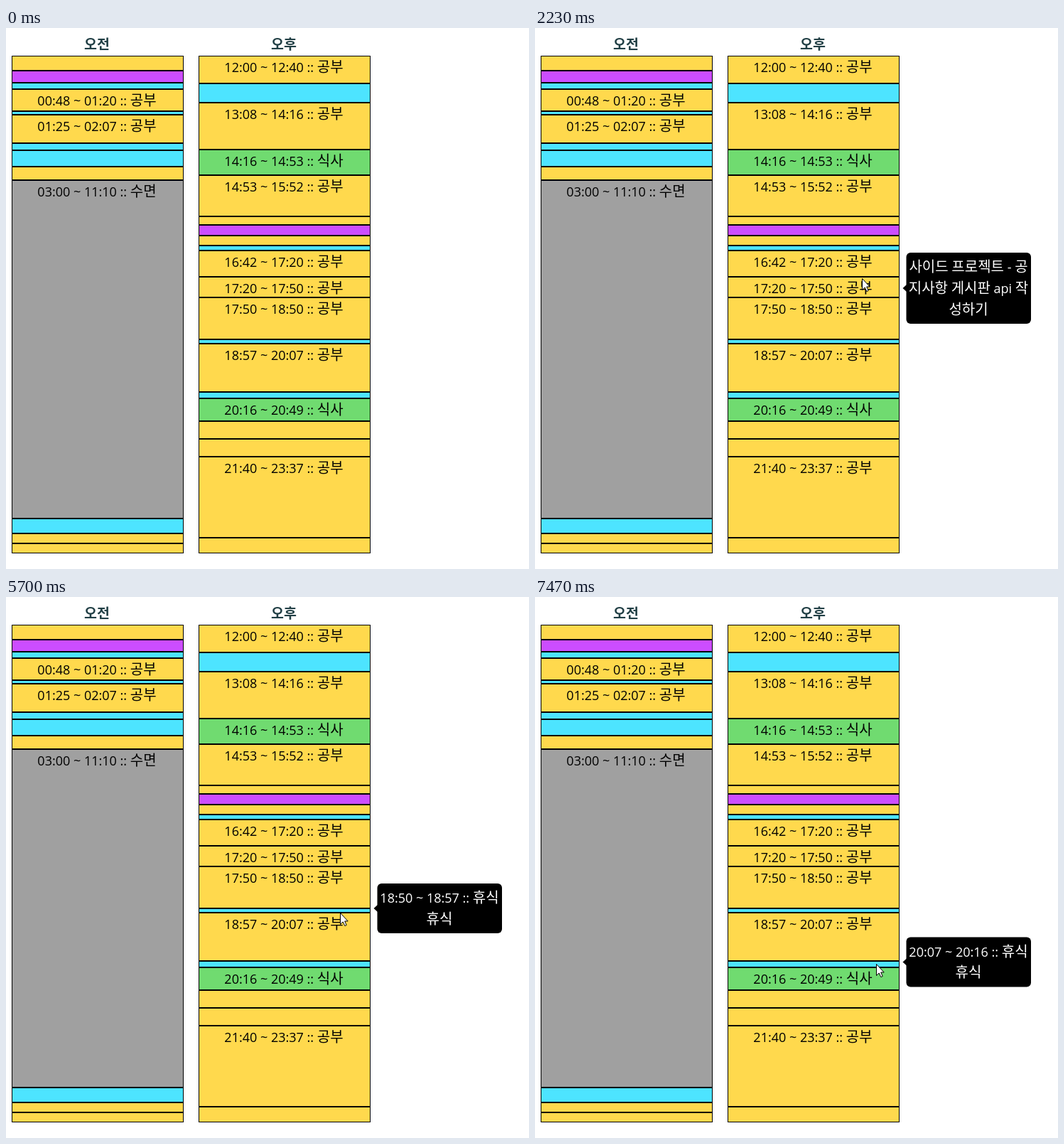
Write an HTML page that moves like this. It is 736 px wide and 761 px high and loops after 8000 ms.

```html
<!DOCTYPE html>
<html lang="ko">
<head>
<meta charset="utf-8">
<title>하루 시간표</title>
<style>
  html, body { margin: 0; width: 100%; height: 100%; overflow: hidden; background: #fff; }
  svg { display: block; }
  text { font: 18px "Open Sans", "Noto Sans", sans-serif; text-anchor: middle; white-space: pre; }
  .ko { font-family: "Noto Sans CJK KR", "Noto Sans CJK", sans-serif; font-size: 20px; font-weight: 350; }
  .head { fill: #213f45; }
  .head .ko { font-weight: 700; font-size: 19.5px; }
  .tip text { fill: #fff; }
</style>
</head>
<body>
<svg id="stage" width="736" height="761" viewBox="0 0 736 761"></svg>
<script>
const LOOP = 8000;
const TOP = 39, SCALE = 700 / 720, WIDTH = 242;
const stage = document.getElementById("stage");

const KINDS = {
  s: ["#ffd94d", "공부"],
  r: ["#4de4ff", "휴식"],
  m: ["#70db70", "식사"],
  z: ["#a0a0a0", "수면"],
  p: ["#cc4dff", "기타"]
};

// Each entry is the start minute within the half day and the kind of activity.
const MORNING = "0s 22p 39r 48s 80r 85s 127r 137r 160s 180z 670r 691s 706s";
const AFTERNOON = "0s 40r 68s 136m 173s 232s 245p 260s 275r 282s 320s 350s 410r 417s 487r 496m 529s 554s 580s 697s";

const NOTES = {
  282: ["cs 공부 -스프링"],
  320: ["사이드 프로젝트 - 공", "지사항 게시판 api 작", "성하기"],
  350: ["사이드 프로젝트 - 게", "시판 공통", "GetRequest 생성"],
  417: ["사이드 프로젝트 -공", "지사항 조회 API 기능", "추가 중"]
};

// Pointer moves: first step, last step, number of steps, destination.
const ENTRY = { x: 800, y: 330 };
const MOVES = [
  [980, 1330, 6, 437, 313],
  [1600, 1750, 3, 435, 313],
  [2020, 2230, 4, 460, 352],
  [2300, 2370, 2, 460, 351],
  [3110, 3300, 4, 464, 371],
  [3500, 3560, 2, 463, 394],
  [3890, 4620, 11, 470, 434],
  [4820, 4820, 1, 470, 440],
  [5700, 6070, 6, 470, 463],
  [6290, 6290, 1, 470, 464],
  [6610, 7230, 9, 478, 509],
  [7380, 7470, 2, 480, 516]
];

function add(parent, name, attrs) {
  const node = document.createElementNS("http://www.w3.org/2000/svg", name);
  for (const key in attrs) node.setAttribute(key, attrs[key]);
  parent.appendChild(node);
  return node;
}

function addText(parent, x, y, words, cls = "") {
  const node = add(parent, "text", { x, y, class: cls });
  for (const part of words.split(/([가-힣]+)/)) {
    if (!part) continue;
    const span = add(node, "tspan", /[가-힣]/.test(part) ? { class: "ko" } : {});
    span.textContent = part;
  }
}

const pad = n => String(n).padStart(2, "0");
const clock = min => pad(Math.floor(min / 60)) + ":" + pad(min % 60);
const edge = min => Math.round(TOP + min * SCALE);

function addColumn(x, title, plan, offset) {
  const mid = x + WIDTH / 2 - 1;
  addText(stage, mid, 30, title, "head");
  const items = plan.split(" ");
  return items.map((item, i) => {
    const start = parseInt(item);
    const end = i + 1 < items.length ? parseInt(items[i + 1]) : 720;
    const [fill, name] = KINDS[item.slice(-1)];
    const top = edge(start), bottom = edge(end);
    const label = `${clock(start + offset)} ~ ${clock(end + offset)} :: ${name}`;
    const labeled = end - start >= 30;
    add(stage, "rect", {
      x: x + 0.5, y: top + 0.5, width: WIDTH - 1, height: bottom - top - 1,
      fill, stroke: "#000"
    });
    if (labeled) addText(stage, mid, top + 23, label);
    return { x, top, bottom, start, label, name, labeled };
  });
}

function addTip(block) {
  const lines = NOTES[block.start] || [block.label, block.name];
  const height = lines.length * 30 + 10;
  const mid = Math.floor((block.top + block.bottom) / 2) + (block.labeled ? 0 : -4);
  const top = TIP_TOPS[block.start] ?? mid - height / 2;
  const group = add(stage, "g", { class: "tip", visibility: "hidden" });
  const arrow = top + height / 2;
  add(group, "rect", { x: 522.5, y: top, width: 175.5, height, rx: 6 });
  add(group, "path", { d: `M517.5 ${arrow}l5.5 -5v10z` });
  lines.forEach((line, i) => addText(group, 610, top + 27 + i * 29.8, line));
  return group;
}

const TIP_TOPS = { 282: 308.5, 320: 316, 350: 345, 410: 403, 417: 410.5, 487: 478.5 };

addColumn(8, "오전", MORNING, 0);
const blocks = addColumn(271, "오후", AFTERNOON, 720);
for (const block of blocks) {
  if (block.start in TIP_TOPS) block.tip = addTip(block);
}

const pointer = add(stage, "path", {
  d: "M.5 .5V16.5L4.2 13L6.8 18.6L9.2 17.5L6.7 12H11.2Z",
  fill: "#fff", stroke: "#000", "stroke-width": 1
});
const beam = add(stage, "path", {
  d: "M-3 -8H-1L0 -7L1 -8H3M0 -7V7M-3 8H-1L0 7L1 8H3",
  fill: "none", stroke: "#000", "stroke-width": 1.1
});

function pointerAt(t) {
  let { x, y } = ENTRY;
  for (const [first, last, steps, toX, toY] of MOVES) {
    if (t < first) break;
    const gap = steps > 1 ? (last - first) / (steps - 1) : 1;
    const done = Math.min(steps, Math.floor((t - first) / gap + 1e-6) + 1);
    const k = done / steps;
    const p = first === MOVES[0][0] ? 1 - (1 - k) ** 2 : k;
    x += (toX - x) * p;
    y += (toY - y) * p;
  }
  return { x, y };
}

function draw(t) {
  const { x, y } = pointerAt(t);
  const hover = x < 512 && blocks.find(b => y >= b.top && y < b.bottom);
  const onText = hover && hover.labeled && x < 475 && y > hover.top + 4 && y < hover.top + 30;
  for (const b of blocks) {
    if (b.tip) b.tip.setAttribute("visibility", b === hover ? "visible" : "hidden");
  }
  const place = `translate(${Math.round(x)} ${Math.round(y)})`;
  pointer.setAttribute("transform", place);
  beam.setAttribute("transform", place);
  pointer.setAttribute("visibility", onText ? "hidden" : "visible");
  beam.setAttribute("visibility", onText ? "visible" : "hidden");
}

const began = performance.now();
function tick() {
  draw((performance.now() - began) % LOOP);
  requestAnimationFrame(tick);
}
draw(0);
requestAnimationFrame(tick);
</script>
</body>
</html>
```
